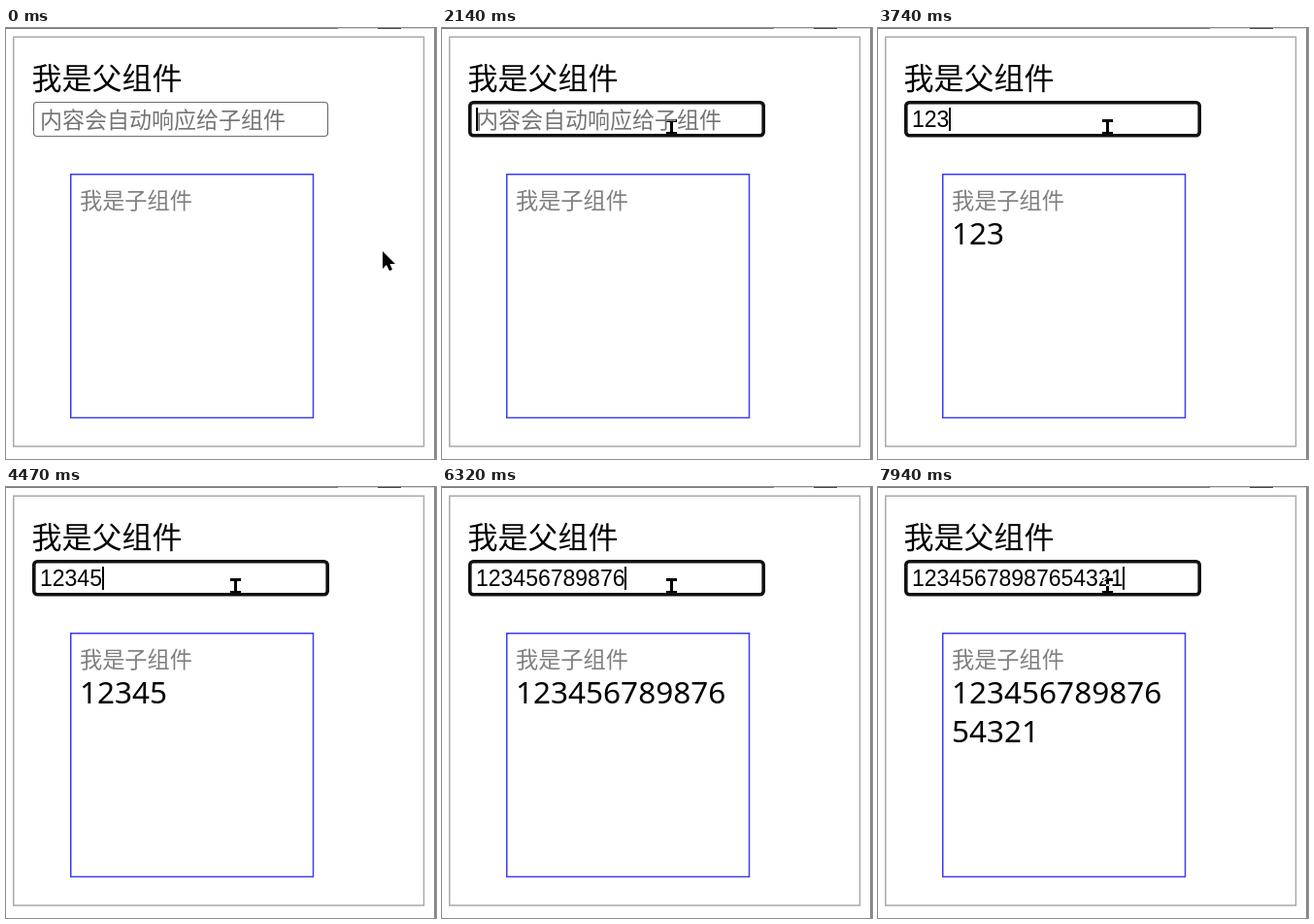
These frames come from a looping animation (443 px wide and 444 px high, 8 s). An HTML page with a canvas:

```html
<!DOCTYPE html>
<html lang="zh">
<head>
<meta charset="utf-8">
<style>
  html, body { margin: 0; width: 100%; height: 100%; overflow: hidden; background: #fff; }
  canvas { display: block; }
</style>
</head>
<body>
<canvas id="stage" width="443" height="444"></canvas>
<script>
const ctx = document.getElementById('stage').getContext('2d');
const LOOP = 8000;
const CJK = '"Noto Sans CJK SC", "Noto Sans CJK", sans-serif';
const ARIAL = '23px "Liberation Sans", Arial, sans-serif';
const CHILD = '31.5px "Noto Sans", sans-serif';

const TYPED = '12345678987654321';
const KEY_TIMES = [3280, 3460, 3740, 4020, 4470, 4750, 4930, 5210, 5490,
                   5770, 5950, 6320, 6600, 6850, 7310, 7590, 7940];
const ROW_CHARS = 12;
const FOCUS_AT = 2140, CARET_OFF = 2680, CARET_ON = 3190;
const MOVE_AT = 1100, MOVE_STEP = 85.9, MOVE_STEPS = 10;

function text(str, x, y, font, color) {
  ctx.font = font;
  ctx.fillStyle = color;
  ctx.fillText(str, x, y);
}

function box(x, y, w, h, radius, width, color) {
  ctx.beginPath();
  ctx.roundRect(x, y, w, h, radius);
  ctx.lineWidth = width;
  ctx.strokeStyle = color;
  ctx.stroke();
}

function bar(x, y, w, h, color) {
  ctx.fillStyle = color;
  ctx.fillRect(x, y, w, h);
}

function pointerAt(t) {
  const step = t < MOVE_AT ? 0 : Math.min(MOVE_STEPS, Math.floor((t - MOVE_AT) / MOVE_STEP) + 1);
  const left = 1 - step / MOVE_STEPS;
  const x = Math.round(236 + 152 * left ** 1.513);
  const y = Math.round(103 + 127 * left ** 1.378);
  return { x, y, inField: y < 112 };
}

function drawPage() {
  bar(0, 0, 443, 444, '#fff');
  bar(0, 0, 443, 1, '#7b7b7b');
  bar(342, 0, 99, 1, '#d8d8d8');
  bar(383, 0, 24, 1, '#444');
  bar(441, 0, 2, 444, '#8a8a8a');
  box(7.75, 9.25, 422.75, 421.75, 0, 1.5, '#a9a9a9');
  text('我是父组件', 26.5, 63, '31px ' + CJK, '#000');
  box(66.75, 150.75, 249.75, 250.75, 0, 1.5, '#3c3cf4');
  text('我是子组件', 76, 186, '23.2px ' + CJK, '#808080');
}

function drawField(t, value, hovered) {
  const focused = t >= FOCUS_AT;
  if (focused) box(28.8, 76.8, 302.4, 34, 3.5, 3.6, '#101010');
  else box(28.5, 76.5, 303, 35, 3.5, 1.2, hovered ? '#4f4f4f' : '#6f6f6f');

  if (value) text(value, 35, 102, ARIAL, '#000');
  else text('内容会自动响应给子组件', 35, 103, '23px ' + CJK, '#757575');

  if (focused && (t < CARET_OFF || t >= CARET_ON)) {
    ctx.font = ARIAL;
    bar(Math.round(35 + ctx.measureText(value).width), 82, 2, 24, '#000');
  }
}

// The pointer inverts whatever lies beneath it.
function drawPointer({ x, y, inField }) {
  ctx.save();
  ctx.globalCompositeOperation = 'difference';
  ctx.translate(x, y);
  ctx.fillStyle = '#fff';
  ctx.beginPath();
  if (inField) {
    ctx.rect(-5, -9, 11, 3);
    ctx.rect(-1, -6, 3, 10);
    ctx.rect(-5, 4, 11, 2);
  } else {
    ctx.moveTo(0, 0);
    for (const [px, py] of [[0, 18], [4, 14], [7, 20], [10, 19], [7.5, 13], [13, 13]]) ctx.lineTo(px, py);
    ctx.closePath();
  }
  ctx.fill();
  ctx.restore();
}

function draw(t) {
  const value = TYPED.slice(0, KEY_TIMES.filter(key => t >= key).length);
  const pointer = pointerAt(t);
  drawPage();
  drawField(t, value, pointer.inField);
  text(value.slice(0, ROW_CHARS), 76, 223, CHILD, '#000');
  text(value.slice(ROW_CHARS), 76, 263, CHILD, '#000');
  drawPointer(pointer);
}

function tick() {
  draw(performance.now() % LOOP);
  requestAnimationFrame(tick);
}
tick();
</script>
</body>
</html>
```
